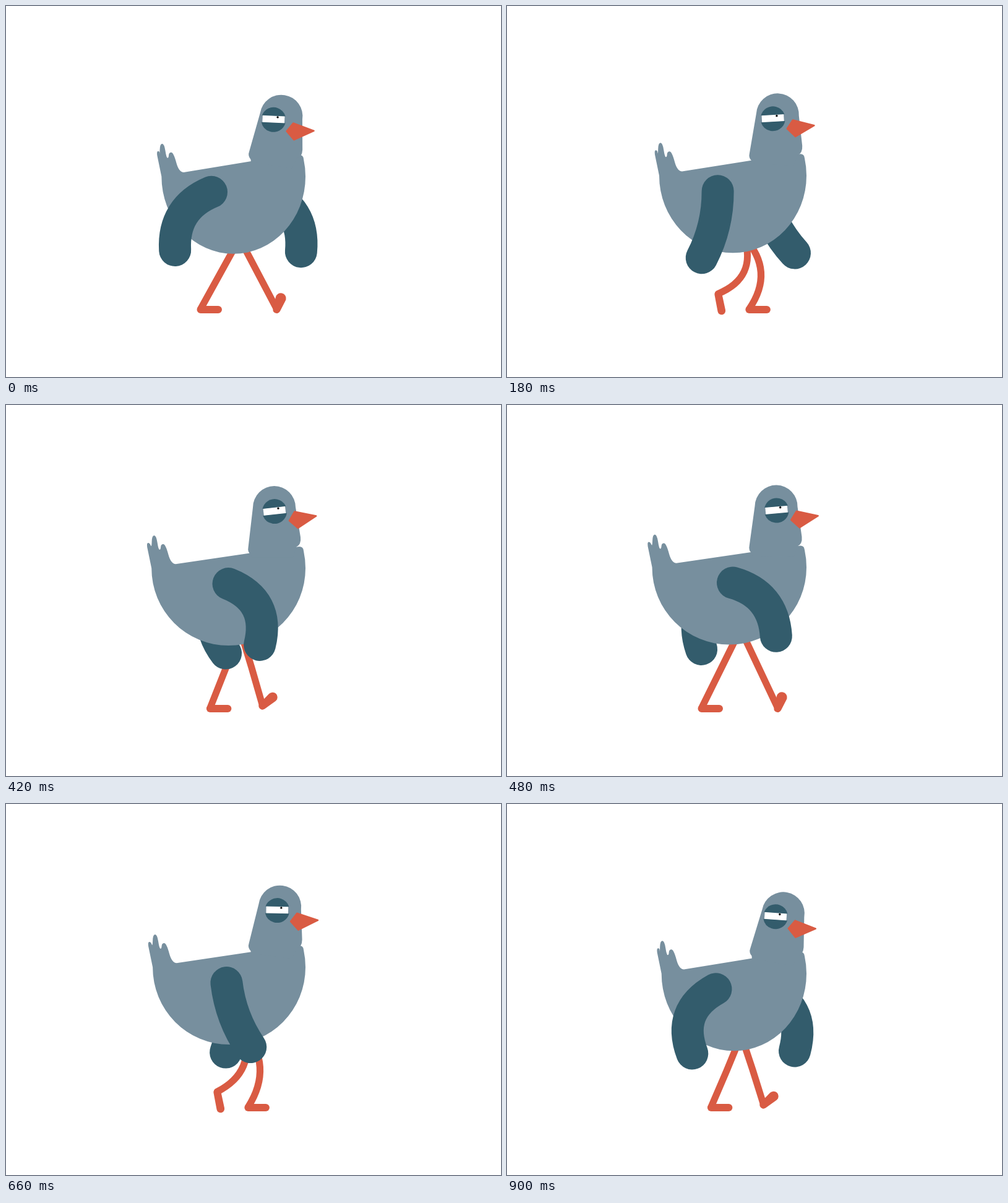
Animation, 800 px wide and 600 px high, one loop 960 ms. Source, as an HTML page with a canvas:

```html
<!DOCTYPE html>
<html lang="en">
<head>
<meta charset="utf-8">
<title>Walking pigeon</title>
<style>
html, body { margin: 0; width: 100%; height: 100%; overflow: hidden; background: #fff; }
canvas { display: block; }
</style>
</head>
<body>
<canvas id="stage" width="800" height="600"></canvas>
<script>
const ctx = document.getElementById('stage').getContext('2d');
const STEPS = 16, HALF = STEPS / 2, STEP_MS = 60;
const GREY = '#778f9e', TEAL = '#335c6c', ORANGE = '#d95b43';

const radians = degrees => degrees * Math.PI / 180;
const mix = (from, to, amount) => from + (to - from) * amount;
const wave = (step, peak, harmonic = 1) =>
  Math.cos(2 * Math.PI * harmonic * (step - peak) / STEPS);

// Thick curve from a to b, bulging forward by the given amount.
function limb(ax, ay, bx, by, bulge, width, color) {
  const dx = bx - ax, dy = by - ay;
  const reach = 2 * bulge / Math.hypot(dx, dy);
  ctx.beginPath();
  ctx.moveTo(ax, ay);
  ctx.quadraticCurveTo((ax + bx) / 2 + dy * reach, (ay + by) / 2 - dx * reach, bx, by);
  ctx.lineWidth = width;
  ctx.lineCap = 'round';
  ctx.strokeStyle = color;
  ctx.stroke();
}

function drawWing(x, y, length, degrees, bulge) {
  const angle = radians(degrees);
  limb(x, y, x + length * Math.sin(angle), y + length * Math.cos(angle), bulge, 52, TEAL);
}

function drawNearWing(step, cy) {
  const eased = ((step % HALF) / HALF) ** 1.37;
  const swing = step < HALF ? eased : 1 - eased;
  drawWing(mix(332, 365, swing), cy + 25, 111, mix(-32, 39, swing), 25 * wave(step, 6.3));
}

function drawFarWing(step, cy) {
  const swing = (1 - Math.abs((step + 15) % STEPS - HALF) / HALF) ** 1.8;
  drawWing(mix(420, 330, swing), cy + 25, 113, mix(33, -32, swing), 27 * wave(step, 14.3));
}

// First half of the stride stands and slides back, second half swings forward.
function drawLeg(step, hipY) {
  const phase = step % STEPS;
  const u = (phase % HALF) / HALF;
  const standing = phase < HALF;
  const bump = Math.sin(Math.PI * u) ** 2;
  const ankleX = standing ? mix(437.5, 314.5, u) : mix(314.5, 437.5, u ** 1.55);
  const ankleY = 491 - (standing ? 0 : 29 * bump);
  const bulge = 23 * Math.sin(Math.PI * u ** 0.7) ** 3;
  limb(377.5 + 7 * bump, hipY, ankleX, ankleY - 1, bulge, 11, ORANGE);

  const curl = standing ? Math.max(0, 1 - 8 * u) : u * u;
  const droop = standing ? 0 : 80 * Math.exp(-(((u - 0.375) / 0.14) ** 2));
  drawFoot(ankleX, ankleY, radians(droop - 70 * curl * curl), 28.5 - 9 * curl, 6 + 2.5 * curl);
}

function drawFoot(x, y, angle, length, toeRadius) {
  const heelRadius = 6;
  const side = Math.acos((heelRadius - toeRadius) / length);
  ctx.save();
  ctx.translate(x, y);
  ctx.rotate(angle);
  ctx.beginPath();
  ctx.arc(0, 0, heelRadius, side, 2 * Math.PI - side);
  ctx.arc(length, 0, toeRadius, -side, side);
  ctx.fillStyle = ORANGE;
  ctx.fill();
  ctx.restore();
}

function drawBody(step, cy) {
  const left = 242 + 8.5 * wave(step, 0.4) + wave(step, 0.4, 2);
  const tail = 51.7 + 0.8 * left;
  const right = 484;
  const feathers = [
    [left - 8 - tail, -41], [left - 3 - tail, -41], [-4.5, -33],
    [-4, -53], [3, -53], [6.5, -30], [10, -30],
    [10.5, -39], [18, -39], [27, -5.5]
  ];
  ctx.beginPath();
  ctx.ellipse((left + right) / 2, cy, (right - left) / 2, 125, 0, 0, Math.PI);
  ctx.lineTo(left - 7, cy - 34);
  feathers.forEach(([x, y], i) => {
    const [nextX, nextY] = feathers[i + 1] || [45, -8.5];
    ctx.quadraticCurveTo(tail + x, cy + y, tail + (x + nextX) / 2, cy + (y + nextY) / 2);
  });
  ctx.lineTo(398, cy - 25);
  ctx.lineTo(474, cy - 35);
  ctx.quadraticCurveTo(480.5, cy - 35, 481, cy - 28);
  ctx.quadraticCurveTo(484, cy - 14, right, cy);
  ctx.fillStyle = GREY;
  ctx.fill();
}

function drawHead(cy, tilt) {
  ctx.save();
  ctx.translate(434, cy - 27.5);
  ctx.rotate(tilt);
  ctx.beginPath();
  ctx.arc(-0.5, -71, 34.5, Math.PI, 0);
  ctx.lineTo(42, -23);
  ctx.quadraticCurveTo(43.5, -11, 35, -7);
  ctx.lineTo(30, 10);
  ctx.lineTo(-37, 10);
  ctx.lineTo(-38, 6);
  ctx.quadraticCurveTo(-44, 1, -42.5, -6);
  ctx.fillStyle = GREY;
  ctx.fill();
  ctx.restore();
}

function eyelid(edge, from, to) {
  const start = Math.asin(edge / 20);
  ctx.beginPath();
  ctx.arc(0, 0, 20, from + start, to - start);
  ctx.fillStyle = TEAL;
  ctx.fill();
}

function drawFace(step, cy, tilt) {
  const lidTop = -6.2, lidBottom = 4.8;
  ctx.save();
  ctx.translate(434 + 4.3 * wave(step, 11), cy - 92);
  ctx.rotate(tilt - 0.113);
  ctx.fillStyle = '#fff';
  ctx.fillRect(-17.8, lidTop - 0.5, 35.6, lidBottom - lidTop + 1);
  eyelid(-lidTop, Math.PI, 2 * Math.PI);
  eyelid(lidBottom, 0, Math.PI);
  ctx.beginPath();
  ctx.arc(6.5, -4.3, 1.7, 0, 2 * Math.PI);
  ctx.fillStyle = '#000';
  ctx.fill();

  ctx.beginPath();
  ctx.moveTo(22, 17.5);
  ctx.lineTo(32, 4);
  ctx.lineTo(66, 14.8);
  ctx.lineTo(34.6, 31);
  ctx.closePath();
  ctx.lineWidth = 2.4;
  ctx.lineJoin = 'round';
  ctx.fillStyle = ctx.strokeStyle = ORANGE;
  ctx.fill();
  ctx.stroke();
  ctx.restore();
}

function draw(step) {
  const cy = 269.2 + 7.2 * wave(step, 1);
  const tilt = (6.5 + 7 * wave(step, 14)) / 71;
  ctx.fillStyle = '#fff';
  ctx.fillRect(0, 0, 800, 600);
  drawLeg(step, cy + 100);
  drawFarWing(step, cy);
  drawLeg(step + HALF, cy + 100);
  drawBody(step, cy);
  drawHead(cy, tilt);
  drawFace(step, cy, tilt);
  drawNearWing(step, cy);
}

function tick() {
  draw(Math.floor(performance.now() / STEP_MS) % STEPS);
  requestAnimationFrame(tick);
}
tick();
</script>
</body>
</html>
```
